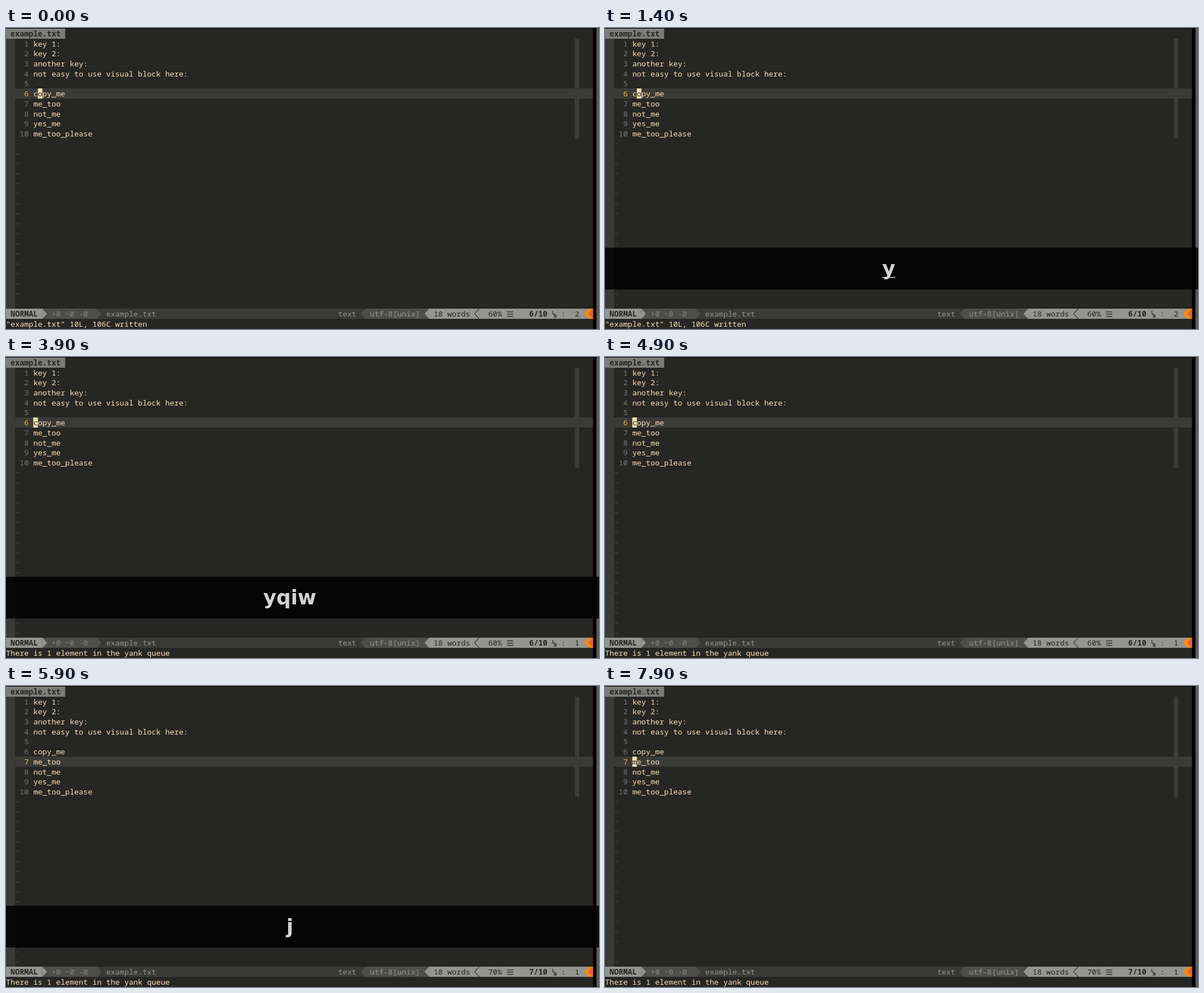
An HTML page with a canvas for the animation above (8000 ms loop, 1051 by 533 pixels).

```html
<!DOCTYPE html>
<html lang="en">
<head>
<meta charset="utf-8">
<style>
  html, body { margin: 0; width: 100%; height: 100%; overflow: hidden; background: #000; }
  canvas { display: block; }
</style>
</head>
<body>
<canvas id="stage" width="1051" height="533"></canvas>
<script>
const ctx = document.getElementById('stage').getContext('2d');
const LOOP = 8000, CELL = 8.064, ROW = 17.73, TOP = 1, COLS = 129;
const BG = '#262624', DIM = '#3a3a38', MID = '#4e4e4c', LIGHT = '#949492', TEXT = '#ffdfaf';
const MONO = '13.44px "Noto Sans Mono", monospace';

const lines = ['key 1:', 'key 2:', 'another key:', 'not easy to use visual block here:', '',
  'copy_me', 'me_too', 'not_me', 'yes_me', 'me_too_please'];

// Key presses shown in the band: [time, label]; an empty label hides it.
const keys = [[0, ''], [1400, 'y'], [1700, 'yq'], [2000, 'yqi'], [2200, 'yqiw'], [4800, ''],
  [5300, 'j'], [7800, '']];
// Times at which the cursor toggles, starting visible.
const blinks = [400, 900, 2400, 2900, 3400, 3900, 4400, 4900, 5900, 6400, 6900, 7400];

const X = col => col * CELL;
const Y = row => TOP + row * ROW;

function rect(color, x, y, w, h) {
  ctx.fillStyle = color;
  ctx.fillRect(x, y, w, h);
}

function cells(color, col, row, width, height = 1) {
  const y = Math.round(Y(row));
  rect(color, X(col), y, X(width), Math.round(Y(row + height)) - y);
}

function text(str, col, row, color, bold) {
  ctx.font = (bold ? 'bold ' : '') + MONO;
  ctx.textAlign = 'left';
  ctx.fillStyle = color;
  ctx.fillText(str, X(col), Y(row) + 13.8);
}

// Triangle one cell wide in the status row, pointing right (1) or left (-1).
function arrow(color, col, dir, open) {
  const base = X(dir > 0 ? col : col + 1), tip = base + dir * CELL;
  const y = Math.round(Y(28)), h = 18;
  ctx.beginPath();
  ctx.moveTo(base, y);
  ctx.lineTo(tip, y + h / 2);
  ctx.lineTo(base, y + h);
  ctx.fillStyle = ctx.strokeStyle = color;
  ctx.lineWidth = 1.1;
  open ? ctx.stroke() : ctx.fill();
}

function drawEditor(line, col, cursorOn) {
  rect('#000', 0, 0, 1051, 533);
  rect(BG, 0, TOP, X(COLS), 532);
  rect('#5a5a58', 1046.5, 0, 4.5, 533);

  cells('#7c7c7a', 0, 0, 13);
  text('example.txt', 1, 0, BG, true);
  cells(DIM, 0, 1, 2, 27);
  cells(DIM, 2, line, COLS - 2);
  cells(DIM, 125, 1, 1, 10);

  lines.forEach((str, i) => {
    const n = i + 1;
    text(String(n).padStart(3), 2, n, n === line ? '#ffaf1a' : '#767674');
    text(str, 6, n, TEXT);
  });
  for (let row = 11; row < 28; row++) text('~', 2, row, MID);

  if (cursorOn) {
    cells(TEXT, 6 + col - 1, line, 1);
    text(lines[line - 1][col - 1], 6 + col - 1, line, BG);
  }
}

function drawStatus(line, col, message) {
  cells(DIM, 0, 28, COLS);
  cells(MID, 8, 28, 12);
  arrow(MID, 20, 1);
  cells(LIGHT, 0, 28, 8);
  arrow(LIGHT, 8, 1);
  text('NORMAL', 1, 28, BG, true);
  text('+0 ~0 -0', 10, 28, '#858583');
  text('example.txt', 22, 28, LIGHT);

  text('text', 73, 28, LIGHT);
  arrow(MID, 78, -1);
  cells(MID, 79, 28, 14);
  text('utf-8[unix]', 80, 28, LIGHT);
  arrow(LIGHT, 92, -1);
  cells(LIGHT, 93, 28, COLS - 93);
  text('18 words', 94, 28, BG);
  arrow(BG, 103, -1, true);
  text(line * 10 + '%', 106, 28, BG);
  for (let i = 0; i < 3; i++) rect(BG, 888, 502 + i * 4, 11, 1.3);
  text(line + '/10', 115, 28, BG, true);
  ctx.font = 'bold 8px "Noto Sans Mono", monospace';
  ctx.fillText('L', 968, 507);
  ctx.fillText('N', 971, 513);
  text(':', 122, 28, BG);
  text(String(col), 125, 28, BG);
  arrow('#ff8700', 127, -1);
  cells('#ff8700', 128, 28, 1);
  arrow('#d75f5f', 128, -1);

  text(message, 0, 29, TEXT);
}

function drawKeys(label, age) {
  if (!label) return;
  rect('rgba(0,0,0,0.86)', 0, 389, 1051, 74);
  ctx.font = 'bold 35.7px "DejaVu Sans", sans-serif';
  ctx.textAlign = 'left';
  ctx.fillStyle = '#d3d3cf';
  const width = ctx.measureText(label).width, x = 503 - width / 2;
  ctx.fillText(label, x, 438);
  if (age < 200) {
    const last = ctx.measureText(label.at(-1)).width;
    ctx.fillRect(x + width - last, 441, last, 1.4);
  }
}

function frame() {
  const t = performance.now() % LOOP;
  const line = t < 5400 ? 6 : 7;
  const col = t < 2600 ? 2 : 1;
  const message = t < 2600 ? '"example.txt" 10L, 106C written' : 'There is 1 element in the yank queue';
  const cursorOn = blinks.filter(b => b <= t).length % 2 === 0;
  const [pressed, label] = keys.findLast(k => k[0] <= t);

  drawEditor(line, col, cursorOn);
  drawStatus(line, col, message);
  drawKeys(label, t - pressed);
  requestAnimationFrame(frame);
}
frame();
</script>
</body>
</html>
```
